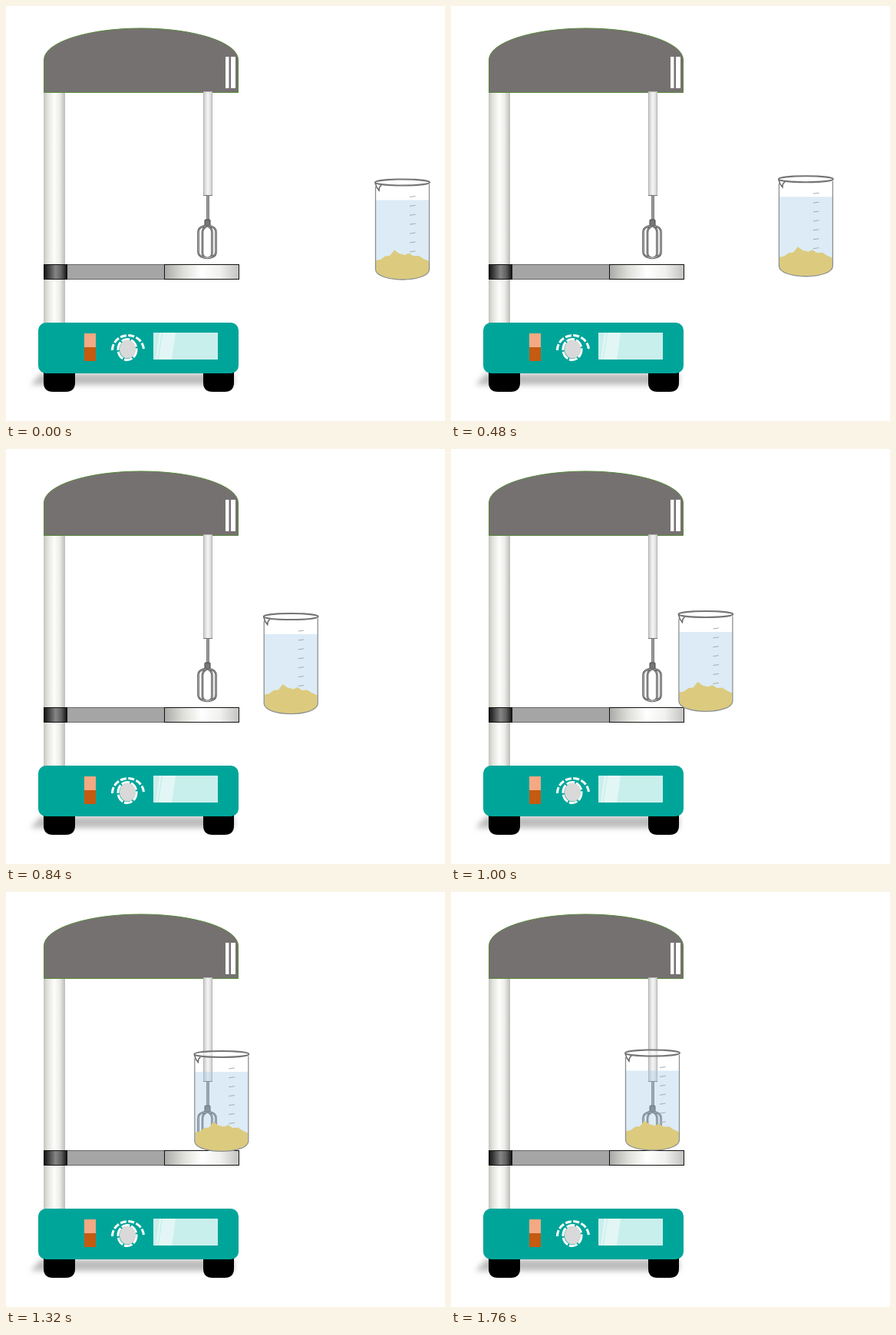
These frames come from a looping animation (572x540 px, 3.27 s). An HTML page:

```html
<!DOCTYPE html>
<html lang="en">
<head>
<meta charset="utf-8">
<title>Mixer and beaker</title>
<style>
  html, body { margin: 0; width: 100%; height: 100%; overflow: hidden; background: #fff; }
  svg { display: block; width: 572px; height: 540px; }
</style>
</head>
<body>
<svg viewBox="0 0 572 540">
  <defs>
    <linearGradient id="column">
      <stop offset="0" stop-color="#c6c6be"/>
      <stop offset=".2" stop-color="#e4e4de"/>
      <stop offset=".5" stop-color="#fdfdfb"/>
      <stop offset=".75" stop-color="#ececea"/>
      <stop offset="1" stop-color="#bcbcb8"/>
    </linearGradient>
    <linearGradient id="shaft">
      <stop offset="0" stop-color="#c8c8c8"/>
      <stop offset=".5" stop-color="#f6f6f6"/>
      <stop offset="1" stop-color="#cfcfcf"/>
    </linearGradient>
    <linearGradient id="clamp">
      <stop offset="0" stop-color="#111"/>
      <stop offset=".5" stop-color="#858585"/>
      <stop offset=".75" stop-color="#606060"/>
      <stop offset="1" stop-color="#111"/>
    </linearGradient>
    <linearGradient id="plate">
      <stop offset="0" stop-color="#a9a9a7"/>
      <stop offset=".25" stop-color="#deded9"/>
      <stop offset=".5" stop-color="#fff"/>
      <stop offset=".75" stop-color="#f0f0ee"/>
      <stop offset="1" stop-color="#c2c2c0"/>
    </linearGradient>
    <filter id="soft" x="-10%" y="-60%" width="120%" height="220%">
      <feGaussianBlur stdDeviation="3.5"/>
    </filter>
  </defs>

  <!-- feet and shadow -->
  <path d="M46 478H297V493H32Z" fill="#bcbcbc" filter="url(#soft)"/>
  <path id="foot" d="M49 474H90V490Q90 502 78 502H61Q49 502 49 490Z"/>
  <path d="M257 474H297V490Q297 502 285 502H269Q257 502 257 490Z"/>

  <!-- stand -->
  <rect x="49" y="112" width="28" height="301" fill="url(#column)"/>
  <rect x="79.5" y="336.5" width="127" height="19" fill="#a5a5a5" stroke="#666"/>
  <rect x="49.5" y="336.5" width="30" height="19" fill="url(#clamp)" stroke="#111"/>
  <rect x="206.500" y="336.5" width="97" height="19" fill="url(#plate)" stroke="#111"/>

  <!-- head -->
  <path d="M49.500 112.500V70A126.500 41 0 0 1 302.500 70V112.500Z" fill="#767171" stroke="#57883b"/>
  <path d="M286 66h4.500v41h-4.500zM293 66h6v41h-6z" fill="#fff"/>

  <!-- control box -->
  <rect x="42" y="412" width="261" height="66" rx="10" fill="#00a59a"/>
  <rect x="102" y="426" width="15" height="18" fill="#f4a983"/>
  <rect x="102" y="444" width="15" height="18" fill="#c55a11"/>
  <g fill="none" stroke="#fff" stroke-width="3">
    <path d="M138.500 448A20 19 0 0 1 179.500 448" stroke-dasharray="8 2.500"/>
    <ellipse cx="158" cy="447" rx="12" ry="13.500" stroke-dasharray="11 2"/>
  </g>
  <ellipse cx="158.500" cy="446.500" rx="10.500" ry="12" fill="#d9d9d9"/>
  <rect x="192" y="425" width="84" height="35" fill="#c9efec"/>
  <path d="M200 425H221L216 460H195Z" fill="#e2f7f5"/>
  <path d="M203.500 425L198 460" stroke="#c9efec" stroke-width="1.500"/>

  <!-- whisk -->
  <rect x="257.500" y="111.500" width="11" height="135" fill="url(#shaft)" stroke="#b4b4b4"/>
  <path d="M257 246.500H269" stroke="#777"/>
  <path d="M263 247V279" stroke="#555" stroke-width="3.500"/>
  <path d="M263 247V279" stroke="#ddd" stroke-width="1"/>
  <rect x="259" y="278" width="7" height="9" rx="1" fill="#777" stroke="#444"/>
  <g fill="none" stroke="#484848" stroke-width="2.600">
    <path id="wires" d="M260 286Q250.500 288 250.500 294V320Q251 327 262 328Q273.500 327 273.500 320V294Q273.500 288 265 286M261 287Q256 289 256 295V322Q257 328 262 328Q268 328 268.500 322V295Q268.500 289 264 287"/>
  </g>
  <use href="#wires" fill="none" stroke="#d4d4d4" stroke-width=".8"/>

  <!-- beaker -->
  <g id="beaker">
    <path d="M482 252.500H551V343C551 351 535 356 516.500 356S482 351 482 343Z" fill="#9ec7e6" fill-opacity=".36"/>
    <path d="M482 331L488 330L494 325.500L500 325L506 317.500L512 322L520 324L525 321.500L531 325.500L538 325L544 329L551 332V343C551 351 535 356 516.500 356S482 351 482 343Z" fill="#dccb7e"/>
    <path id="marks" stroke="#a3acb2" fill="none"/>
    <path d="M481.500 235V343C482 351 498 356 516.500 356S551 351 551.500 343V232" fill="none" stroke="#8c9092" stroke-width="1.300"/>
    <ellipse cx="516.500" cy="229.500" rx="35.500" ry="4" fill="#fff" fill-opacity=".5" stroke="#777476" stroke-width="2"/>
    <path d="M481 230L483 236L486 240L486.500 236L489 233" fill="none" stroke="#666" stroke-width="1.500"/>
  </g>
</svg>
<script>
  const LOOP = 3270, STEP = 40, PEAK = 760, ARRIVE = 1700;
  const TRAVEL_X = 254, TRAVEL_Y = 20, SPEEDUP_X = 122;
  const beaker = document.getElementById('beaker');

  document.getElementById('marks').setAttribute('d',
    Array.from({ length: 7 }, (_, i) => `M526 ${248.5 + i * 11.9}l7.500 -1`).join(''));

  // Speeds up to PEAK, then slows into place.
  function distance(t) {
    if (t < PEAK) return SPEEDUP_X * (t / PEAK) ** 1.77;
    const left = Math.max(0, (ARRIVE - t) / (ARRIVE - PEAK));
    return TRAVEL_X - (TRAVEL_X - SPEEDUP_X) * left ** 2.18;
  }

  function draw(now) {
    const t = Math.floor((now % LOOP) / STEP) * STEP;
    const x = distance(t);
    const y = x / TRAVEL_X * TRAVEL_Y;
    beaker.setAttribute('transform', `translate(${-x.toFixed(2)} ${-y.toFixed(2)})`);
  }

  const start = performance.now();
  function tick() {
    draw(performance.now() - start);
    requestAnimationFrame(tick);
  }
  tick();
</script>
</body>
</html>
```
